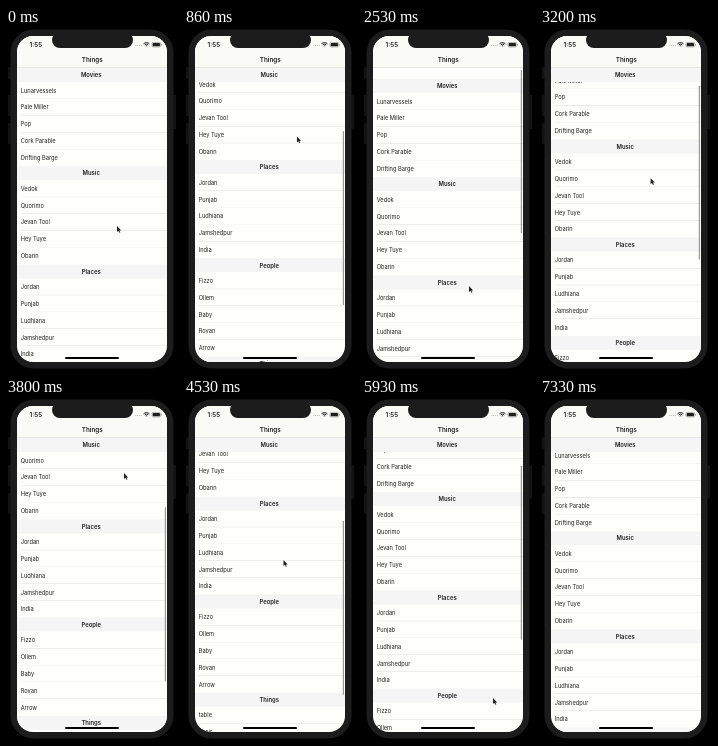
Animation, 172 px wide and 342 px high, one loop 7400 ms. Source, as an HTML page with a canvas:

```html
<!DOCTYPE html>
<html lang="en">
<head>
<meta charset="utf-8">
<title>Things</title>
<style>
  html, body { margin: 0; width: 100%; height: 100%; overflow: hidden; background: #000; }
  canvas { display: block; width: 172px; height: 342px; }
</style>
</head>
<body>
<canvas></canvas>
<script>
const WIDTH = 172, HEIGHT = 342, LOOP = 7400, RESET_AT = 7330;
const SCREEN = { x: 11, y: 8, w: 150, h: 326, r: 16 };
const LIST_TOP = 40, HEADER = 14, ROW = 16.84, MAX_SCROLL = 190;
const FONT = 'Inter, "Liberation Sans", sans-serif';
const BEZEL = '#1c1c1c', INK = '#1e1e1e';

const sections = [
  ['Movies', 'Lunarvessels', 'Pale Miller', 'Pop', 'Cork Parable', 'Drifting Barge'],
  ['Music', 'Vedok', 'Quorimo', 'Jevan Tool', 'Hey Tuye', 'Obarin'],
  ['Places', 'Jordan', 'Punjab', 'Ludhiana', 'Jamshedpur', 'India'],
  ['People', 'Fizzo', 'Ollem', 'Baby', 'Rovan', 'Arrow'],
  ['Things', 'table', 'chair', 'fan', 'cup', 'cube'],
];
const SECTION = HEADER + 5 * ROW;

// Turning points of the gestures; the motion between them is eased.
const poses = [
  { t: 0, scroll: 0, x: 111, y: 198 },
  { t: 900, scroll: 110, x: 113, y: 108 },
  { t: 1460, scroll: 200, x: 114, y: 217 },
  { t: 1900, scroll: MAX_SCROLL, x: 112, y: 200 },
  { t: 2530, scroll: -11, x: 107, y: 258 },
  { t: 2950, scroll: 0, x: 108, y: 193 },
  { t: 3800, scroll: 115, x: 118, y: 75 },
  { t: 4530, scroll: 138, x: 99.5, y: 162 },
  { t: 4950, scroll: 139, x: 104, y: 205 },
  { t: 5930, scroll: 44, x: 131, y: 300 },
  { t: 6400, scroll: 0, x: 134, y: 309 },
];

const canvas = document.querySelector('canvas');
const ctx = canvas.getContext('2d');
const ratio = window.devicePixelRatio || 1;
canvas.width = WIDTH * ratio;
canvas.height = HEIGHT * ratio;
ctx.scale(ratio, ratio);

const clamp = (v, lo, hi) => Math.min(hi, Math.max(lo, v));

// Monotone cubic interpolation: smooth, never past a pose.
function sample(key, time) {
  const last = poses.length - 1;
  const t = Math.min(time, poses[last].t);
  const slope = i => (poses[i + 1][key] - poses[i][key]) / (poses[i + 1].t - poses[i].t);
  const tangent = i => {
    if (i === 0 || i === last) return 0;
    const a = slope(i - 1), b = slope(i);
    return a * b > 0 ? 2 * a * b / (a + b) : 0;
  };
  let i = 0;
  while (i < last - 1 && t >= poses[i + 1].t) i++;
  const from = poses[i], to = poses[i + 1], span = to.t - from.t;
  const u = (t - from.t) / span, v = 1 - u;
  return from[key] * (1 + 2 * u) * v * v + to[key] * u * u * (3 - 2 * u)
    + span * u * v * (tangent(i) * v - tangent(i + 1) * u);
}

function rect(x, y, w, h, color, r = 0) {
  ctx.fillStyle = color;
  ctx.beginPath();
  ctx.roundRect(x, y, w, h, r);
  ctx.fill();
}

function text(str, x, y, size, weight = 400, align = 'center') {
  ctx.font = `${weight} ${size}px ${FONT}`;
  ctx.textAlign = align;
  ctx.fillStyle = INK;
  ctx.fillText(str, x, y);
}

function drawPhone() {
  rect(0, 0, WIDTH, HEIGHT, '#000');
  for (let i = 0; i < 3; i++) rect(2, 39 + i * 28, 3, i ? 21 : 12, '#121212', 1);
  rect(167, 67, 3, 34, '#121212', 1);
  rect(4.5, 1.5, 163, 339, BEZEL, 23);
}

function drawList(scroll) {
  sections.forEach(([, ...rows], s) => {
    rows.forEach((name, i) => {
      const y = LIST_TOP + s * SECTION + HEADER + i * ROW - scroll;
      text(name, 14.7, y + 10.6, 5.7, 400, 'left');
      if (i < rows.length - 1) rect(14.7, y + ROW - 0.4, 147, 0.4, '#dedede');
    });
  });
  sections.forEach(([title], s) => {
    const natural = LIST_TOP + s * SECTION - scroll;
    const y = Math.min(Math.max(natural, LIST_TOP), natural + SECTION - HEADER);
    rect(SCREEN.x, y, SCREEN.w, HEADER, '#f5f5f6');
    text(title, 85.2, y + 9.2, 5.9, 600);
  });
}

function drawScrollbar(scroll, t) {
  const over = Math.max(0, -scroll, scroll - MAX_SCROLL);
  const top = 42 + 0.585 * clamp(scroll, 0, MAX_SCROLL) + (scroll > 0 ? over : 0);
  ctx.globalAlpha = clamp((t - 50) / 100, 0, 1) * clamp((7000 - t) / 250, 0, 1);
  rect(158.8, top, 1.2, 174 - over, '#999', 0.6);
  ctx.globalAlpha = 1;
}

function drawStatusBar() {
  rect(SCREEN.x, SCREEN.y, SCREEN.w, LIST_TOP - SCREEN.y, '#fafaf6');
  rect(SCREEN.x, LIST_TOP - 0.5, SCREEN.w, 0.5, '#d6d8d0');
  rect(46, 4, 81, 16, BEZEL, 8);
  text('1:55', 29.9, 19.3, 6.4, 600);
  text('Things', 86.3, 34.2, 6.3, 600);
  for (let i = 0; i < 4; i++) rect(129.3 + i * 1.8, 17, 1, 1, '#aaa', 0.5);

  ctx.strokeStyle = INK;
  ctx.lineWidth = 1;
  for (let r = 1; r < 5; r += 1.6) {
    ctx.beginPath();
    ctx.arc(140.5, 18.8, r, -Math.PI * 0.75, -Math.PI * 0.25);
    ctx.stroke();
  }
  ctx.lineWidth = 0.5;
  ctx.strokeStyle = '#777';
  ctx.beginPath();
  ctx.roundRect(146, 14.4, 8.6, 4.6, 1.2);
  ctx.stroke();
  rect(146.7, 15.1, 7.2, 3.2, INK, 0.6);
  rect(155.1, 16, 0.6, 1.5, '#777');
}

const arrow = new Path2D('M0 0V6L1.4 4.8L2.4 6.8L3.3 6.4L2.4 4.4H4.2Z');

function drawCursor(x, y) {
  ctx.save();
  ctx.translate(x, y);
  ctx.lineWidth = 0.9;
  ctx.strokeStyle = '#fff';
  ctx.stroke(arrow);
  ctx.fillStyle = INK;
  ctx.fill(arrow);
  ctx.restore();
}

function draw(t) {
  const isReset = t >= RESET_AT;
  const scroll = isReset ? 5 : sample('scroll', t);
  drawPhone();
  ctx.save();
  ctx.beginPath();
  ctx.roundRect(SCREEN.x, SCREEN.y, SCREEN.w, SCREEN.h, SCREEN.r);
  ctx.clip();
  rect(SCREEN.x, SCREEN.y, SCREEN.w, SCREEN.h, '#fefefc');
  drawList(scroll);
  if (!isReset) drawScrollbar(scroll, t);
  drawStatusBar();
  rect(59, 329, 54, 2, '#000', 1);
  ctx.restore();
  if (!isReset) drawCursor(sample('x', t), sample('y', t));
}

// The picture steps 15 times per second, on whole hundredths.
function stepTime(ms) {
  const step = Math.ceil((Math.floor(ms / 10) + 1) * 3 / 20) - 1;
  return Math.floor(step * 20 / 3) * 10;
}

const start = performance.now();
function tick() {
  draw(stepTime((performance.now() - start) % LOOP));
  requestAnimationFrame(tick);
}
tick();
</script>
</body>
</html>
```
